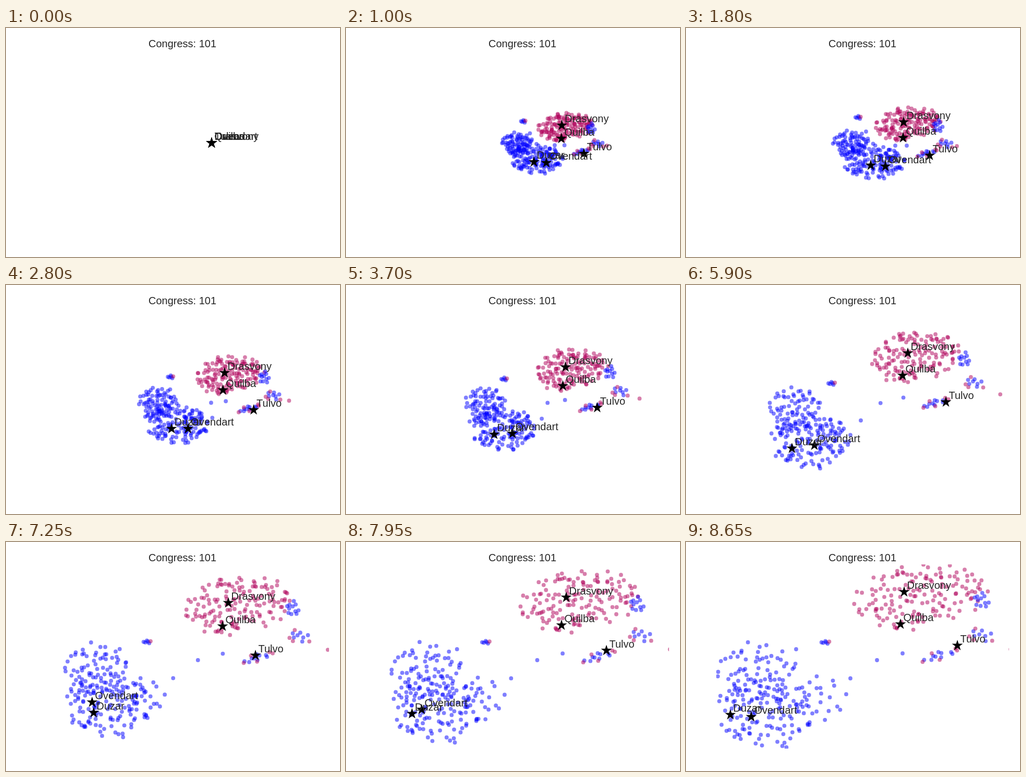
Animation, 640 px wide and 440 px high, one loop 8700 ms. Source, as an HTML page:

```html
<!DOCTYPE html>
<html lang="en">
<head>
<meta charset="utf-8">
<title>Congress: 101</title>
<style>
  html, body { margin: 0; width: 100%; height: 100%; overflow: hidden; background: #fff; }
  svg { display: block; width: 640px; height: 440px; }
  text { font: 20px "Liberation Sans", Arial, sans-serif; fill: #262626; }
  .blue { fill: #00f; fill-opacity: .5; }
  .red { fill: #b0005a; fill-opacity: .5; }
</style>
</head>
<body>
<svg viewBox="0 0 640 440">
  <clipPath id="axes"><rect x="58" y="43" width="561" height="354"/></clipPath>
  <text x="338" y="37" text-anchor="middle">Congress: 101</text>
  <g id="dots" clip-path="url(#axes)"></g>
  <g id="stars"></g>
  <g id="labels"></g>
</svg>
<script>
const LOOP = 8700, STEP = 50;
const START = 100, OPEN = 1800, END = 8650;
const ORIGIN = [394, 221];

let seed = 101;
const rand = () => (seed = (seed * 16807) % 2147483647) / 2147483647;
const spread = size => (rand() - 0.5) * size;
const clamp = p => Math.min(1, Math.max(0, p));
const lerp = (a, b, p) => a + (b - a) * p;
const linear = p => p;
const easeOut = p => Math.sin(p * Math.PI / 2);

function add(parent, tag, attrs) {
  const el = document.createElementNS("http://www.w3.org/2000/svg", tag);
  for (const k in attrs) el.setAttribute(k, attrs[k]);
  return document.getElementById(parent).appendChild(el);
}

// Everything unfolds from one point until OPEN
function place(el, x, y, unfold) {
  const px = lerp(ORIGIN[0], x, unfold), py = lerp(ORIGIN[1], y, unfold);
  el.setAttribute("transform", `translate(${px.toFixed(2)} ${py.toFixed(2)})`);
}

// An ellipse of dots; from and to hold centre x, centre y, radius x, radius y
function cloud(n, reds, tilt, ease, from, to) {
  const turn = rand() * 6.28;
  const dots = Array.from({ length: n }, (_, i) => {
    const a = turn + i * 2.39996 + spread(0.6);
    const r = Math.min(1.04, Math.sqrt((i + 0.5) / n) + spread(0.17));
    return {
      el: add("dots", "circle", { r: 3.9, class: i < n - reds ? "blue" : "red" }),
      x: r * Math.cos(a), y: r * Math.sin(a),
      phase: rand() * 6.28, speed: 0.0006 + rand() * 0.0006
    };
  });
  const c = Math.cos(tilt), s = Math.sin(tilt);

  return (t, p, unfold) => {
    const at = (i, q) => lerp(from[i], to[i], q);
    const cx = at(0, ease(p)), cy = at(1, ease(p));
    const rx = at(2, p * p), ry = at(3, p); // width grows late
    for (const d of dots) {
      const w = d.phase + t * d.speed;
      const x = (d.x + 0.05 * Math.sin(w)) * rx;
      const y = (d.y + 0.05 * Math.cos(w)) * ry;
      place(d.el, cx + x * c - y * s, cy + x * s + y * c, unfold);
    }
  };
}

const stray = (reds, x0, y0, x1, y1) =>
  cloud(1, reds, 0, easeOut, [x0, y0, 0, 0], [x1, y1, 0, 0]);

const starPoints = Array.from({ length: 10 }, (_, i) => {
  const r = i % 2 ? 4.2 : 11, a = i * Math.PI / 5;
  return [r * Math.sin(a), -r * Math.cos(a)].map(v => v.toFixed(2));
}).join(" ");

// A named star that visits its stops at fixed moments
const STOPS = [OPEN, 5900, 7250, END];
function leader(name, ...stops) {
  const star = add("stars", "polygon", { points: starPoints });
  const label = add("labels", "text", { x: 5.5, y: -6 });
  label.textContent = name;

  return (t, p, unfold) => {
    const i = t < STOPS[1] ? 0 : t < STOPS[2] ? 1 : 2;
    const q = clamp((t - STOPS[i]) / (STOPS[i + 1] - STOPS[i]));
    const [x, y] = [0, 1].map(k => lerp(stops[i][k], stops[i + 1][k], q));
    place(star, x, y, unfold);
    place(label, x, y, unfold);
  };
}

const parts = [
  // the two wings
  cloud(74, 0, 0.1, linear, [316, 221, 34, 24], [136, 253, 74, 62]),
  cloud(124, 0, 0.05, linear, [356, 256, 58, 33], [154, 327, 96, 67]),
  cloud(20, 0, 0, easeOut, [393, 258, 25, 26], [257, 300, 50, 48]),
  cloud(150, 150, -0.15, linear, [424, 184, 62, 30], [446, 104, 128, 59]),
  // small groups
  cloud(6, 1, 0, easeOut, [330, 172, 6, 4], [267, 193, 9, 4]),
  cloud(11, 0, 0.3, linear, [483, 189, 10, 14], [567, 113, 16, 17]),
  cloud(11, 4, 0.2, easeOut, [497, 223, 16, 9], [565, 180, 26, 15]),
  cloud(14, 5, -0.3, linear, [462, 240, 22, 5], [487, 217, 38, 9]),
  stray(0, 401, 226, 366, 227),
  stray(0, 423, 226, 415, 214),
  stray(0, 345, 199, 211, 206),
  stray(0, 419, 253, 315, 262),
  stray(1, 519, 227, 622, 206),

  leader("Drasvony", [417, 181], [425, 131], [426, 117], [418, 96]),
  leader("Quilba", [416, 211], [415, 174], [415, 162], [411, 158]),
  leader("Tulvo", [467, 245], [498, 225], [478, 218], [520, 199]),
  leader("Duzar", [354, 264], [203, 314], [168, 328], [85, 332]),
  leader("Ovendart", [382, 266], [246, 308], [165, 308], [125, 336])
];

function draw(t) {
  const unfold = 1 - (1 - clamp((t - START) / (OPEN - START))) ** 2.5;
  const p = clamp((t - OPEN) / (END - OPEN));
  parts.forEach(part => part(t, p, unfold));
}

const begin = performance.now();
let last = -1;
function tick() {
  const t = Math.floor((performance.now() - begin) % LOOP / STEP) * STEP;
  if (t !== last) draw(last = t);
  requestAnimationFrame(tick);
}
tick();
</script>
</body>
</html>
```
